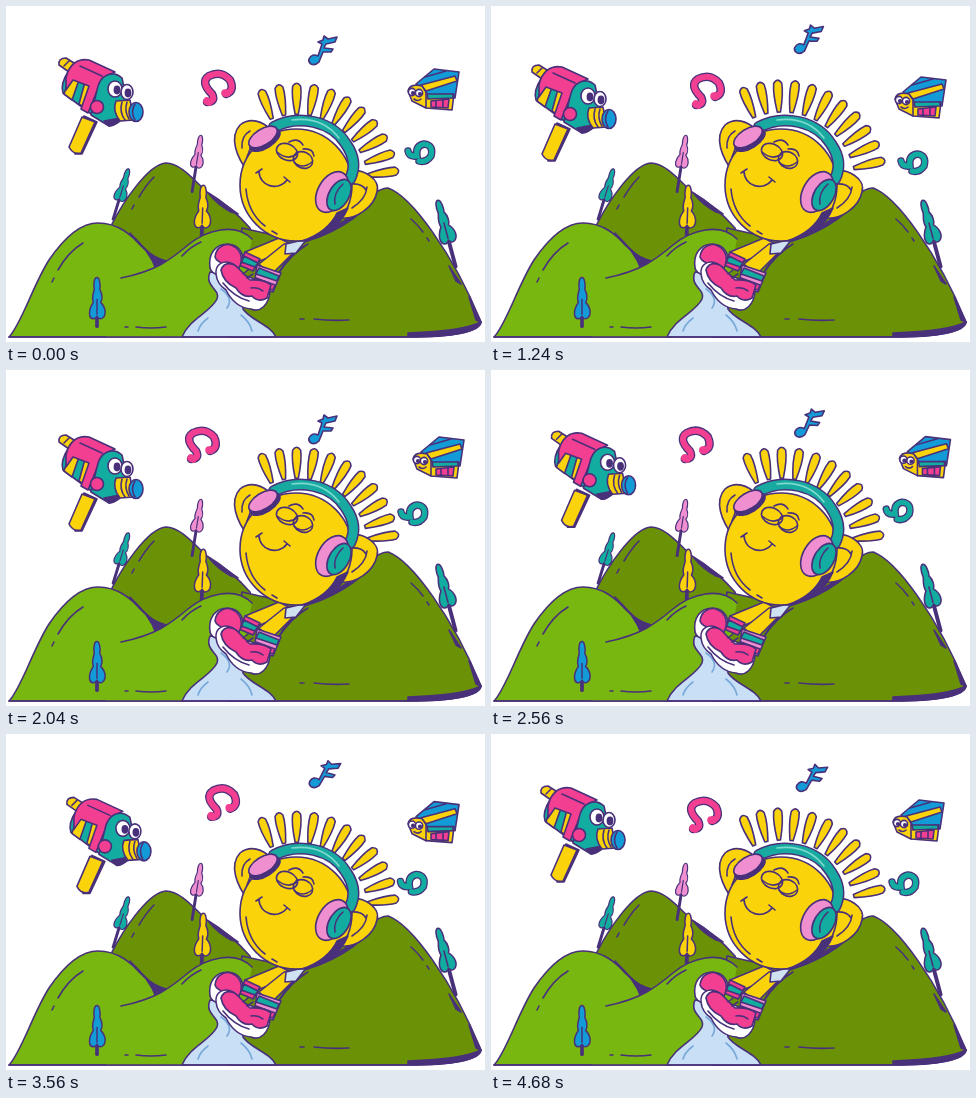
An HTML page for the animation above (4720 ms loop, 479 by 336 pixels).

```html
<!DOCTYPE html>
<html lang="en">
<head>
<meta charset="utf-8">
<title>Sunny hills</title>
<style>
  html, body { margin: 0; width: 100%; height: 100%; overflow: hidden; background: #fff; }
  svg { display: block; width: 479px; height: 336px; }
  .ink { stroke: #49307a; stroke-width: 1.6; stroke-linejoin: round; stroke-linecap: round; }
  .line { fill: none; }
  .dark { fill: #49307a; }
  .yellow { fill: #fbd30b; }
  .pink { fill: #f33f91; }
  .rose { fill: #f08fd0; }
  .teal { fill: #12aca0; }
  .blue { fill: #129bd6; }
  .white { fill: #fff; }
  .shade { fill: #6b9206; }
  .grass { fill: #78b710; }
</style>
</head>
<body>
<svg viewBox="0 0 479 336">
  <defs>
    <path id="leaf" d="M0-44C3-44 4-35 3-31C6-26 6-20 4-17C10-11 10-3 6 0C3 2 1 0 0-2C-2 2-7 2-8-3C-9-8-6-14-4-17C-6-22-4-27-3-31C-4-38-3-44 0-44Z"/>
    <path id="ray" d="M74-1.6C84-3.6 96-5 103-4Q109 0 103 4C96 5 84 3.6 74 1.6Z"/>
    <g id="pinkCurl">
      <path d="M201 96Q210 96 206 88Q194 76 203 70Q215 64 224 74Q229 85 220 88"/>
      <path d="M201 95L203 96M219 87L221 87" stroke-width="3"/>
    </g>
    <path id="tealCurl" d="M402 145Q403 151 411 150Q409 140 418 138Q428 139 425 150Q420 157 413 155"/>
  </defs>

  <!-- hills -->
  <g class="ink">
    <path class="shade" d="M106 218C116 198 142 158 160 157C174 157 188 174 201 186C216 195 230 206 244 222L250 250L106 268Z"/>
    <path class="line" d="M133 191Q140 179 148 171M128 199L126 203"/>
    <path class="dark" d="M203 188Q218 198 232 208L225 206Q212 199 203 188Z"/>
    <g id="backTrees"></g>
    <path class="shade" d="M222 331L236 222L285 233C315 224 333 214 343 207C360 196 370 182 382 182C405 190 447 247 475 316C474 327 440 331 400 331Z"/>
    <path class="dark" d="M290 238C320 228 347 212 368 190C356 212 322 231 290 238ZM463 291L475 316L470 314ZM443 260L455 278L450 275ZM302 238Q282 248 272 268Q285 248 302 238Z"/>
    <path class="dark" d="M475 316C460 324 430 326 402 327V331C440 331 472 328 475 316Z"/>
    <path class="line" d="M405 213Q412 219 417 226M421 232L423 235M294 313H298M308 313Q325 315 343 314"/>
    <path class="grass" d="M3 331C15 319 27 279 43 254C60 229 76 217 92 217C124 217 136 246 158 258L180 331Z"/>
    <path class="dark" d="M124 227Q143 253 165 256L150 263Q144 246 124 227Z"/>
    <path class="grass" stroke="none" d="M100 331L120 271C150 264 165 253 182 239C200 224 229 216 246 233L238 275L215 331Z"/>
    <path class="line" d="M115 272C150 265 164 254 182 239C200 224 229 216 246 233M52 264Q62 246 77 237M48 272L46 276M176 250Q184 241 195 236M119 321H122M130 321Q145 323 160 321"/>
    <path fill="#c8dff6" d="M204 266C198 281 215 283 211 293C205 306 184 312 176 331H270C265 319 244 314 237 303L235 270Z"/>
    <path class="line" stroke="#78a9da" d="M215 283Q228 292 221 302M202 312Q194 318 192 325M235 309Q244 316 246 325"/>
    <path class="line" d="M3 331H402"/>
    <g id="frontTrees"></g>
  </g>

  <!-- sun -->
  <g id="rays" class="ink yellow"></g>
  <g class="ink">
    <path class="yellow" d="M243 167C230 151 223 131 234 119C244 111 257 115 265 124L264 150Z"/>
    <path class="line" d="M236 142Q235 130 244 125M241 151L246 138"/>
    <path class="yellow" d="M342 166C356 161 375 173 371 186C368 201 350 214 334 212Z"/>
    <path class="line" d="M346 202Q360 193 361 181M345 178Q356 177 360 184"/>
    <path class="yellow" d="M273 232L239 246L246 258L290 241Z"/>
    <path class="yellow" d="M278 238L253 258L265 269L298 236Z"/>
    <path fill="#cfe2f2" d="M280 238L301 233L290 247L279 248Z"/>
    <path class="pink" d="M239 246L254 253L247 265L233 259Z"/>
    <path class="teal" d="M238 250L252 257L249 261L235 256Z"/>
    <path class="white" d="M204 262C202 248 209 238 222 238C234 239 238 248 236 256L228 267C218 271 206 270 204 262Z"/>
    <path class="pink" d="M209 251C210 241 219 236 227 240C236 244 237 254 233 262L221 258Q211 257 209 251Z"/>
    <path class="rose" d="M251 259L275 267L267 286L248 280Z"/>
    <path class="teal" d="M253 262L273 270L271 275L250 268Z"/>
    <path class="pink" d="M250 272L269 279L267 284L248 278Z"/>
    <path class="white" d="M210 268C209 258 218 253 227 258L240 270Q257 275 264 285C263 299 254 307 245 303C232 302 224 292 220 284Q211 278 210 268Z"/>
    <path class="pink" d="M215 264C218 255 228 256 234 264L244 274Q258 273 265 279L261 292Q252 297 246 290Q236 292 230 282Q217 276 215 264Z"/>
    <path class="line" d="M237 268L242 264M241 272L247 268M217 277Q228 291 243 295M245 282Q252 281 257 285"/>

    <ellipse class="yellow" cx="290" cy="179" rx="56" ry="56"/>
    <path class="line" d="M240 183Q242 207 259 220M266 225L271 228"/>
    <path class="dark" d="M342 202Q330 230 296 235Q322 226 331 207Z"/>
    <g class="line">
      <ellipse cx="281" cy="146" rx="11" ry="8" transform="rotate(25 281 146)"/>
      <ellipse cx="297" cy="154" rx="10" ry="8" transform="rotate(25 297 154)"/>
      <path d="M271 146Q282 155 291 148M288 156Q296 164 306 156M283 136Q292 131 297 139M297 143Q307 142 308 150M253 165C253 180 272 186 281 174M250 167L256 163M278 171L284 176"/>
    </g>
    <path class="line" stroke-width="12" style="stroke-width:12" d="M268 121C292 108 326 115 340 138C349 151 349 163 344 173"/>
    <path class="line" style="stroke:#18aaa0;stroke-width:9" d="M268 121C292 108 326 115 340 138C349 151 349 163 344 173"/>
    <path class="line" style="stroke:#7cd9cd" d="M286 114Q316 110 333 132"/>
    <ellipse class="dark" cx="259" cy="134" rx="17" ry="8" transform="rotate(-32 259 134)"/>
    <ellipse class="rose" cx="257" cy="131" rx="16" ry="8" transform="rotate(-32 257 131)"/>
    <ellipse class="rose" cx="326" cy="186" rx="14" ry="22" transform="rotate(30 326 186)"/>
    <ellipse class="teal" cx="333" cy="189" rx="10" ry="17" transform="rotate(30 333 189)"/>
    <path class="line" d="M329 198Q327 187 337 178"/>
  </g>

  <!-- floating things -->
  <g id="camera" class="ink">
    <path class="dark" d="M78 110L91 116L76 148L69 148Z"/>
    <path class="yellow" d="M76 111L89 116L75 147Q67 149 63 141Z"/>
    <path class="yellow" d="M53 59Q52 52 60 52L68 57L63 66Z"/>
    <path class="line" d="M58 60L63 55"/>
    <path class="teal" d="M62 66Q54 78 57 87L88 110L98 78Z"/>
    <path class="yellow" d="M64 70L58 88L66 94L73 74ZM79 76L73 98L80 103L88 80Z"/>
    <path class="pink" d="M60 72C63 58 72 52 83 54L109 66Q97 70 91 85L82 107L75 103L83 80L67 74L60 84Z"/>
    <path class="line" d="M74 60L96 70"/>
    <path class="teal" d="M91 84C94 68 107 64 116 72L122 101Q117 118 103 120L85 109Z"/>
    <circle class="pink" cx="91" cy="101" r="6.5"/>
    <path class="dark" d="M98 115L114 112Q110 120 103 120Z"/>
    <path class="yellow" d="M110 95L124 94L128 114L114 115Q106 105 110 95Z"/>
    <path class="line" d="M116 96Q113 106 119 114M121 96Q118 105 123 113"/>
    <ellipse class="blue" cx="130" cy="106" rx="7" ry="9.5"/>
    <path class="line" d="M129 98Q124 106 129 114"/>
    <ellipse class="white" cx="109" cy="83" rx="7" ry="8"/>
    <ellipse class="white" cx="121" cy="86" rx="6" ry="7.5"/>
    <ellipse class="dark" cx="111" cy="84" rx="2.6" ry="3.6"/>
    <ellipse class="dark" cx="122" cy="87" rx="2.6" ry="3.6"/>
  </g>
  <g id="radio" class="ink">
    <path class="blue" d="M410 78L428 63L453 66L449 92L420 89Z"/>
    <path class="line" d="M419 71L440 65"/>
    <path class="yellow" d="M415 79L449 70L451 75L420 85Z"/>
    <path class="yellow" d="M402 85Q404 77 416 80L422 89L448 88L446 104L420 102L406 95Z"/>
    <path class="teal" d="M421 88L447 88L447 92L422 93Z"/>
    <path class="pink" d="M425 95L443 93L442 102L425 101Z"/>
    <path class="line" d="M430 95V101M437 94V101M420 87V102"/>
    <circle class="white" cx="406" cy="86" r="3.6"/>
    <circle class="white" cx="413" cy="87" r="3.6"/>
    <circle class="dark" cx="407" cy="87" r="1.3"/>
    <circle class="dark" cx="414" cy="88" r="1.3"/>
    <path class="line" d="M408 93Q412 96 415 93"/>
  </g>
  <g id="pinkNote" class="line" stroke-linecap="round">
    <use href="#pinkCurl" stroke="#49307a" stroke-width="8.5"/>
    <use href="#pinkCurl" stroke="#f33f91" stroke-width="6"/>
    <path d="M201 95L203 96M219 87L221 87" stroke="#f33f91" stroke-width="7.5"/>
  </g>
  <g id="blueNote" class="ink blue">
    <path d="M303 53Q306 47 312 50L316 38L312 36L317 34L318 30L322 33L331 31L329 36L320 38L318 42L327 43L325 46L317 46L313 56Q309 60 305 58Q302 56 303 53Z"/>
  </g>
  <g id="tealNote" class="line" stroke-linecap="round">
    <use href="#tealCurl" stroke="#49307a" stroke-width="7.5"/>
    <use href="#tealCurl" stroke="#12aca0" stroke-width="5"/>
  </g>
</svg>

<script>
const LOOP = 4720, STEP = 40, RAY_HOLD = 160;
const $ = id => document.getElementById(id);

const tree = (x, y, turn, size, color, trunk) =>
  `<g transform="translate(${x} ${y}) rotate(${turn}) scale(${size})">
    <path class="line" style="stroke-width:4" d="M0-6V${trunk}"/>
    <use href="#leaf" fill="${color}"/>
    <path class="line" d="M0-20V-4"/></g>`;

$('backTrees').innerHTML =
  tree(113, 194, 17, .74, '#12aca0', 27) +
  tree(190, 161, 9, .73, '#f08fd0', 34) +
  tree(196, 221, 2, .95, '#fbd30b', 15);
$('frontTrees').innerHTML =
  tree(91, 312, 0, .92, '#129bd6', 9) +
  tree(443, 236, -15, .98, '#12aca0', 26);

// Two fans of rays take turns around the sun.
const fan = (start, gap, size) => Array.from({ length: 11 }, (_, i) =>
  `<use href="#ray" transform="translate(291 180) rotate(${start + i * gap}) scale(${size} 1)"/>`).join('');
$('rays').innerHTML = `<g>${fan(-110.6, 10.2, .97)}</g><g>${fan(-112, 9.8, 1)}</g>`;
const fans = $('rays').children;

// Drift offsets at shared times.
const times = [0, 480, 1240, 2040, 3080, 4000, 4680];
const drift = {
  camera: { x: [0, 0, -12, 0, 12, 2, -3], y: [0, -12, 7, 13, 6, 15, 0] },
  radio: { x: [0, -16, 2, 5, 6, -5, 0], y: [0, 11, 8, 4, 4, 5, 3] },
  pinkNote: { x: [0, 8, 4, -16, 4, 2, 1], y: [0, 10, 3, -7, -7, -17, -1] },
  blueNote: { x: [0, 15, 1, 0, 3, 1, 4], y: [0, -10, -11, 15, -1, -4, 0], turn: [0, 9, 2, 0, 7, 9, 8] },
  tealNote: { x: [0, -2, 8, -7, -5, -9, -1], y: [0, -13, 10, -3, -5, 9, 3] }
};

function slope(v, i) {
  const a = Math.max(i - 1, 0), b = Math.min(i + 1, times.length - 1);
  return (v[b] - v[a]) / (times[b] - times[a]);
}

// Smooth cubic through the listed values.
function along(v, t) {
  const last = times.length - 1;
  if (t >= times[last]) return v[last];
  const i = times.findIndex(k => k > t) - 1;
  const span = times[i + 1] - times[i], u = (t - times[i]) / span, w = 1 - u;
  return v[i] * (1 + 2 * u) * w * w + slope(v, i) * span * u * w * w +
    v[i + 1] * u * u * (3 - 2 * u) - slope(v, i + 1) * span * u * u * w;
}

const parts = Object.entries(drift).map(([id, path]) => ({ el: $(id), path }));

function draw(now) {
  const t = Math.floor((now % LOOP) / STEP) * STEP;
  const odd = Math.floor(t / RAY_HOLD) % 2;
  fans[0].style.display = odd ? 'none' : '';
  fans[1].style.display = odd ? '' : 'none';
  for (const { el, path } of parts) {
    const turn = path.turn ? ` rotate(${along(path.turn, t)} 316 44)` : '';
    el.setAttribute('transform', `translate(${along(path.x, t)} ${along(path.y, t)})${turn}`);
  }
  requestAnimationFrame(draw);
}
draw(performance.now());
</script>
</body>
</html>
```
